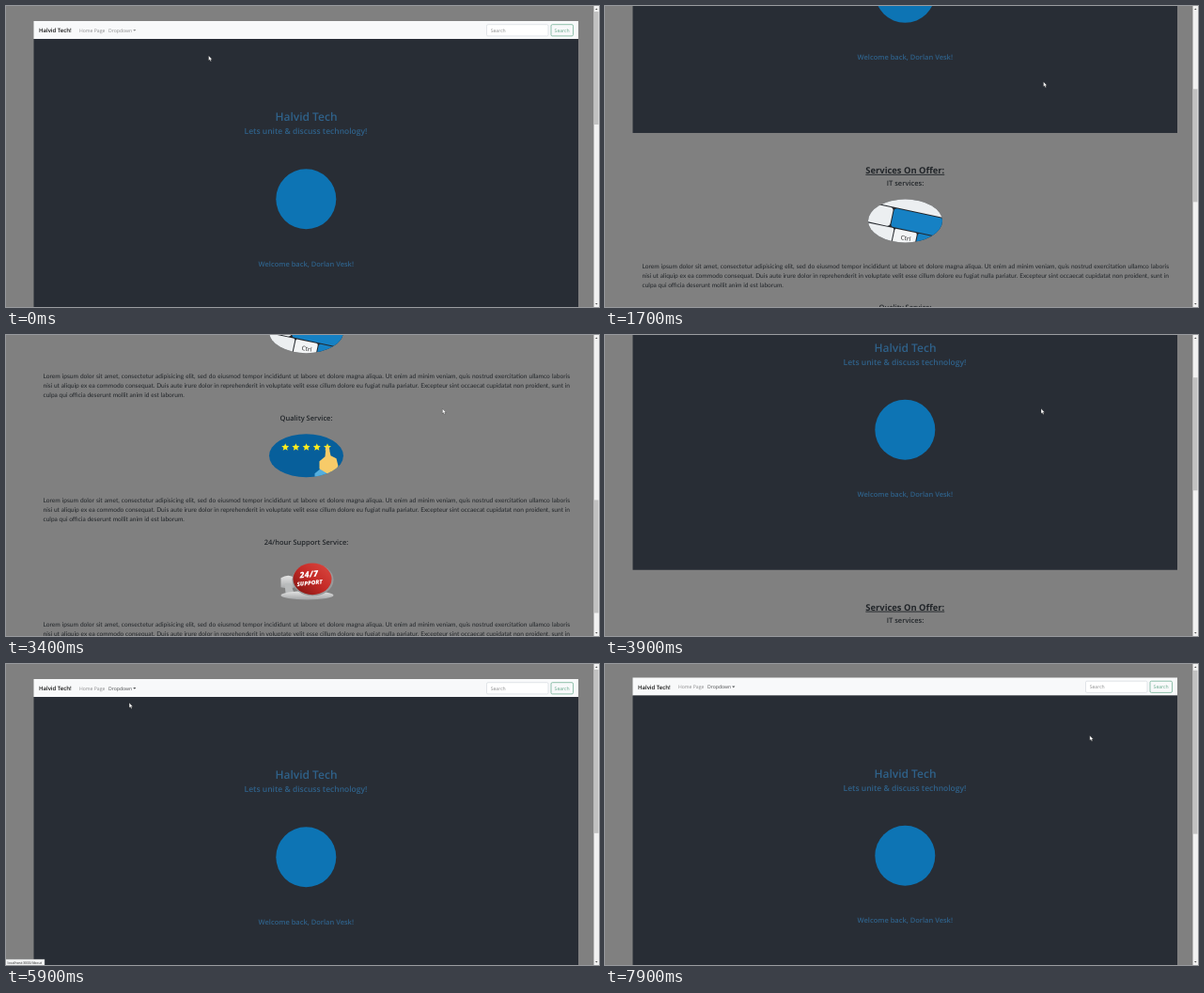
An HTML page that plays this animation: 631x320 px, repeating every 8000 ms.

```html
<!DOCTYPE html>
<html lang="en">
<head>
<meta charset="utf-8">
<title>Halvid Tech</title>
<style>
  html, body { margin: 0; width: 100%; height: 100%; overflow: hidden; background: #808080; }
  #stage { position: relative; width: 631px; height: 320px; overflow: hidden; background: #808080; }
  #page { position: absolute; left: 0; top: 0; width: 625px; height: 821px; }
  svg { position: absolute; left: 0; top: 0; overflow: visible; }
  text, p { text-rendering: geometricPrecision; }
  text { font-family: "Open Sans", "Noto Sans", sans-serif; }
  .mid { text-anchor: middle; font-weight: 600; }
  .blue { fill: #2f6189; }
  .ink { fill: #212529; }
  .section { font-size: 9.4px; font-weight: 700; text-decoration: underline; }
  .service { font-size: 7.5px; }
  .nav { font-size: 5.1px; fill: #8b8c8d; }
  p { position: absolute; left: 39.5px; width: 560.5px; margin: 0; color: #212529;
      font: 6.6px/9.9px Lato, sans-serif; white-space: nowrap; }
  p span { display: block; text-align: justify; text-align-last: justify; }
  p span:last-child { text-align-last: left; }
</style>
</head>
<body>
<div id="stage">
  <div id="page">
    <svg width="625" height="821">
      <defs>
        <clipPath id="oval"><ellipse rx="39.5" ry="23"/></clipPath>
        <path id="star" fill="#ffee1c"/>
        <linearGradient id="red" x1="1" x2="0" y2="1">
          <stop stop-color="#dc4a42"/><stop offset=".5" stop-color="#c42a26"/><stop offset="1" stop-color="#7a1210"/>
        </linearGradient>
        <linearGradient id="silver" x2="0" y2="1">
          <stop stop-color="#e4e4e4"/><stop offset="1" stop-color="#a3a5a7"/>
        </linearGradient>
      </defs>

      <rect x="29.5" y="16" width="579.5" height="19" fill="#f8f9fa"/>
      <text x="35" y="28.3" font-size="6" font-weight="600" fill="#111">Halvid Tech!</text>
      <text class="nav" x="78" y="27.7">Home Page</text>
      <g id="toggle" fill="#8b8c8d">
        <text x="109" y="27.7" font-size="5.1">Dropdown</text>
        <path d="M135.2 25h3.2l-1.6 1.7z"/>
      </g>
      <rect x="511.5" y="19.7" width="65.5" height="12.2" rx="1.4" fill="#fff" stroke="#ced4da" stroke-width=".6"/>
      <text class="nav" x="515.7" y="27.7">Search</text>
      <rect x="580" y="19.7" width="23.5" height="12.2" rx="1.4" fill="none" stroke="#64a88a" stroke-width=".7"/>
      <text x="583.6" y="27.7" font-size="5.1" fill="#64a88a">Search</text>

      <rect x="29.5" y="35" width="579.5" height="319.4" fill="#282d35"/>
      <text class="mid blue" x="319.5" y="122.3" font-size="12">Halvid Tech</text>
      <text class="mid blue" x="319" y="136.4" font-size="8.5">Lets unite &amp; discuss technology!</text>
      <circle cx="319.3" cy="205.3" r="32" fill="#0d74b4"/>
      <text class="mid blue" x="319.3" y="276.6" font-size="7.5">Welcome back, Dorlan Vesk!</text>

      <g id="home">
        <text class="mid ink section" x="319.3" y="397.3">Services On Offer:</text>
        <text class="mid ink service" x="319.5" y="410.2">IT services:</text>
        <text class="mid ink service" x="319.5" y="542.5">Quality Service:</text>
        <text class="mid ink service" x="319.5" y="674.6">24/hour Support Service:</text>

        <g transform="translate(319.5 448)"><g clip-path="url(#oval)">
          <rect x="-40" y="-23" width="80" height="46" fill="#23272c"/>
          <g transform="rotate(12)">
            <rect x="-44" y="-26" width="84" height="14" rx="2" fill="#eceff1"/>
            <rect x="-14" y="-11" width="54" height="20" rx="3" fill="#1681c4"/>
            <rect x="-44" y="-11" width="29" height="20" rx="3" fill="#eceff1"/>
            <rect x="-44" y="10" width="34" height="22" rx="2" fill="#eceff1"/>
            <rect x="-9" y="10" width="24" height="22" rx="2" fill="#f3f5f6"/>
            <rect x="16" y="10" width="24" height="18" rx="2" fill="#1681c4"/>
            <text x="-1" y="20" font-size="6.5" fill="#222">Ctrl</text>
          </g>
        </g></g>

        <g transform="translate(319.5 580)">
          <ellipse rx="39.5" ry="23" fill="#075f9b"/>
          <g clip-path="url(#oval)">
            <g id="stars"></g>
            <path d="M9 19L15 14L27 19V24H9Z" fill="#54aede"/>
            <path d="M21-9q2-2 3 0l2 9 6 3 2 8-4 7-6 2-10-6V6l6-5z" fill="#f7cb69"/>
          </g>
        </g>

        <g transform="translate(319.5 714)">
          <path d="M-27-4q8-5 15 0l2 8-6 4-11-2z" fill="url(#silver)"/>
          <path d="M-23 2h6l4 10h-9z" fill="#b9bbbc"/>
          <ellipse cx="1" cy="14.5" rx="28" ry="4.6" fill="url(#silver)"/>
          <ellipse cx="7" cy="-2" rx="22" ry="17.2" fill="#98999a"/>
          <ellipse cx="6.5" cy="-3" rx="20.5" ry="16.8" fill="url(#red)"/>
          <g transform="rotate(-6)" fill="#fff" text-anchor="middle" font-weight="800" font-style="italic">
            <text x="3.5" y="-4.5" font-size="9">24/7</text>
            <text x="3.5" y="3.8" font-size="6.2">SUPPORT</text>
          </g>
        </g>
        <rect y="816" width="625" height="5" fill="#fff"/>
      </g>

      <g id="about">
        <text class="mid ink section" x="319.3" y="370.5">About us:</text>
        <rect y="562" width="625" height="5" fill="#fff"/>
      </g>

      <g id="menu">
        <rect x="109" y="33.5" width="53" height="16" rx="1.3" fill="#fff" stroke="#c4c6c8" stroke-width=".4"/>
        <rect x="109.3" y="37" width="52.4" height="9" fill="#f1f2f3"/>
        <text class="ink" x="117" y="43.3" font-size="5.1">About</text>
      </g>
    </svg>
    <div id="homeText"></div>
    <div id="aboutText"></div>
  </div>

  <svg width="631" height="320">
    <rect x="625.5" width="5.5" height="320" fill="#f1f1f1"/>
    <path d="M627 4h2.6l-1.3-1.5zM627 316h2.6l-1.3 1.5z" fill="#505050"/>
    <rect id="thumb" x="626" width="4.5" fill="#c1c1c1"/>
    <g id="status">
      <rect x="-.5" y="314" width="41.5" height="7" fill="#f2f3f4" stroke="#b5b7b9" stroke-width=".4"/>
      <text x="1.5" y="318.6" font-size="3.7" fill="#222">localhost:3000/About</text>
    </g>
    <path id="cursor" d="M0 0V5.3L1.2 4.3L2.1 6.2L3 5.8L2.2 4H3.8Z" fill="#fff" stroke="#111" stroke-width=".3"/>
  </svg>
</div>

<script>
const LOOP = 8000;
const VIEW = 320, TRACK_TOP = 6, TRACK = 308;
const byId = id => document.getElementById(id);

const LOREM = [
  'Lorem ipsum dolor sit amet, consectetur adipisicing elit, sed do eiusmod tempor incididunt ut labore et dolore magna aliqua. Ut enim ad minim veniam, quis nostrud exercitation ullamco laboris',
  'nisi ut aliquip ex ea commodo consequat. Duis aute irure dolor in reprehenderit in voluptate velit esse cillum dolore eu fugiat nulla pariatur. Excepteur sint occaecat cupidatat non proident, sunt in',
  'culpa qui officia deserunt mollit anim id est laborum.'
];
const paragraph = top =>
  `<p style="top:${top}px">${LOREM.map(line => `<span>${line}</span>`).join('')}</p>`;
byId('homeText').innerHTML = [492, 624, 756].map(paragraph).join('');
byId('aboutText').innerHTML = [393, 447.5, 502].map(paragraph).join('');

const starPoints = Array.from({ length: 10 }, (_, i) => {
  const angle = i * Math.PI / 5, radius = i % 2 ? 1.9 : 4.2;
  return `${radius * Math.sin(angle)} ${-radius * Math.cos(angle)}`;
});
byId('star').setAttribute('d', `M${starPoints.join('L')}Z`);
byId('stars').innerHTML = [0, 1, 2, 3, 4]
  .map(i => `<use href="#star" x="${-22.3 + i * 11.2}" y="-9"/>`).join('');

// Keys are [time, value]; values in between are linear.
function track(keys, time) {
  const next = keys.findIndex(key => key[0] > time);
  if (next < 0) return keys[keys.length - 1][1];
  if (next === 0) return keys[0][1];
  const [t0, v0] = keys[next - 1], [t1, v1] = keys[next];
  return v0 + (v1 - v0) * (time - t0) / (t1 - t0);
}

const scrollKeys = [
  [980, 0], [1300, 82], [2400, 459], [2750, 492], [3150, 501], [3330, 501], [3900, 105], [4200, 0],
  [6380, 0], [6780, 247], [7620, 247], [7700, 175], [7800, 45], [7900, 1.5]
];
const cursorX = [
  [0, 215.3], [900, 467.3], [1300, 467.3], [2400, 465.2], [3900, 464], [4280, 464], [4750, 125],
  [5100, 131.1], [6050, 131.1], [6400, 516.3], [7600, 516.3], [7900, 515.8]
];
const cursorY = [
  [0, 52.7], [900, 81.7], [1300, 81.7], [2400, 78.3], [4280, 78.3], [4750, 26], [5100, 41.2],
  [6050, 41.2], [6400, 74.5], [7600, 74.5], [7900, 76]
];

const show = (id, visible) => { byId(id).style.display = visible ? '' : 'none'; };

function render(time) {
  const onAbout = time >= 5300;
  const pageHeight = onAbout ? 567 : 821;
  const scroll = track(scrollKeys, time);

  byId('page').style.transform = `translateY(${-scroll}px)`;
  for (const id of ['home', 'homeText']) show(id, !onAbout);
  for (const id of ['about', 'aboutText']) show(id, onAbout);
  show('menu', time >= 4800 && time < 5300);
  show('status', time >= 5000 && time < 6150);
  byId('toggle').setAttribute('fill', time >= 4750 ? '#4c4e50' : '#8b8c8d');

  byId('thumb').setAttribute('y', TRACK_TOP + scroll / pageHeight * TRACK);
  byId('thumb').setAttribute('height', VIEW / pageHeight * TRACK);
  byId('cursor').setAttribute('transform',
    `translate(${track(cursorX, time)} ${track(cursorY, time)})`);
}

function tick() {
  render(performance.now() % LOOP);
  requestAnimationFrame(tick);
}
tick();
</script>
</body>
</html>
```
